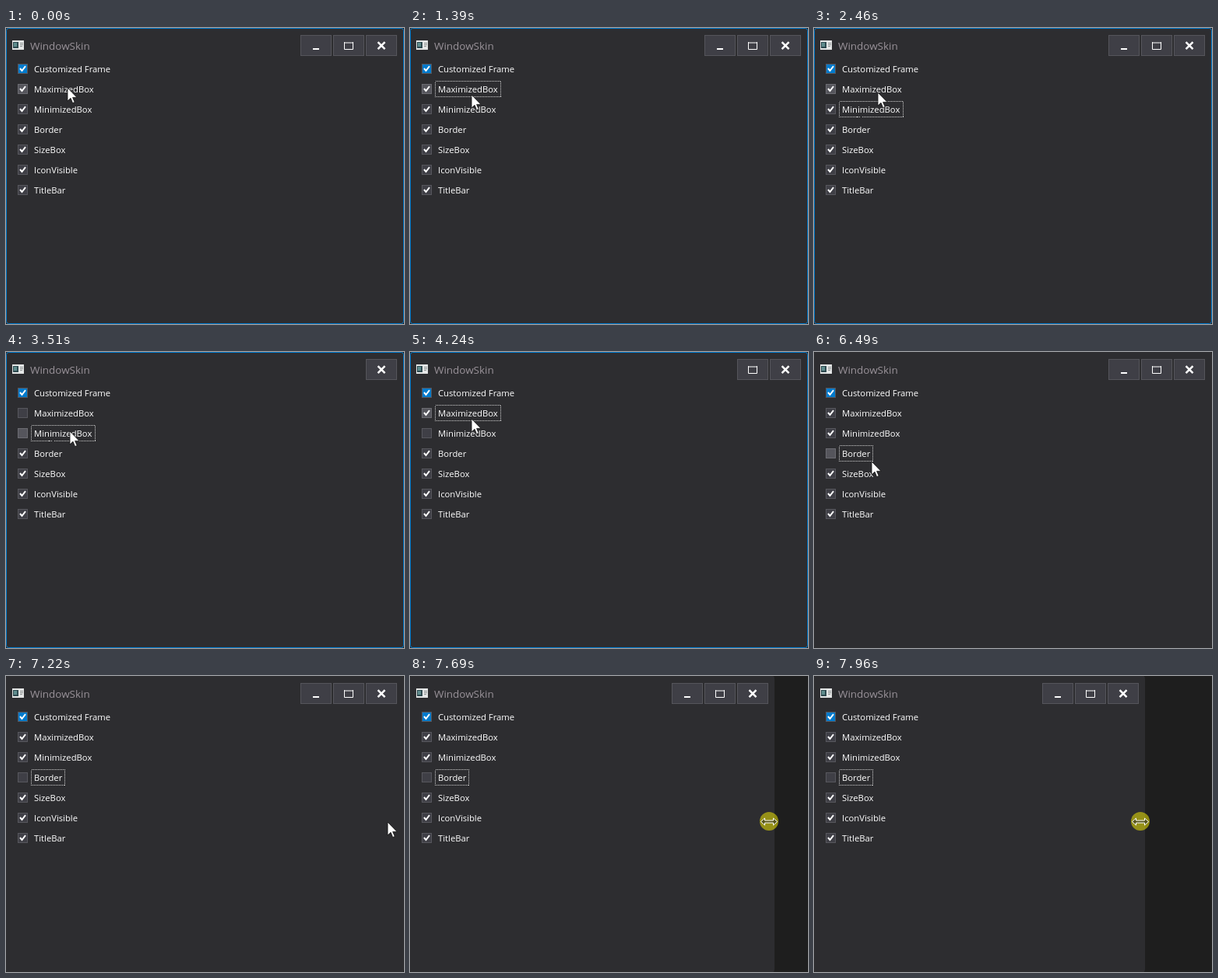
Recreate the animation shown at these times as an HTML page. Size 511 by 381 pixels, loop 8000 ms.

```html
<!DOCTYPE html>
<html lang="en">
<head>
<meta charset="utf-8">
<title>WindowSkin</title>
<style>
  html, body { margin: 0; width: 100%; height: 100%; overflow: hidden; background: #1e1e1e; }
  svg { display: block; width: 511px; height: 381px; }
  text { font-family: "Open Sans", "Noto Sans", sans-serif; }
  .label { font-size: 11.25px; fill: #fff; }
  .title { font-size: 13.45px; fill: #999299; }
  .px { shape-rendering: crispEdges; }
  .btn { fill: #3f3f46; stroke: #55555b; }
</style>
</head>
<body>
<svg id="stage" viewBox="0 0 511 381">
  <rect width="511" height="381" fill="#1e1e1e"/>
  <rect id="win" x="-0.5" y="-0.5" height="382" rx="4" fill="#2d2d30"/>
  <rect id="border" x="0.5" y="0.5" width="510" height="380" rx="3" fill="none" stroke="#007acc"/>
  <g class="px">
    <rect x="8" y="16" width="15" height="12" fill="#e4e6e6"/>
    <rect x="9" y="18" width="7" height="8" fill="#2f4a50"/>
    <rect x="10" y="19" width="4" height="5" fill="#5f8d8e"/>
    <path d="M18 19.5h4M18 21.5h4M18 23.5h3" stroke="#8d9292"/>
  </g>
  <text class="title" x="31" y="28">WindowSkin</text>
  <g id="buttons"></g>
  <g id="rows"></g>
  <rect id="focus" class="px" x="32.5" height="20" fill="none" stroke="#d0d0d0" stroke-dasharray="1 1"/>
  <circle id="halo" r="12" fill="#fff500" fill-opacity=".5"/>
  <path id="arrow" d="M0 0V17L4 13.3L6.6 19.6L9.2 18.5L6.6 12.4H12Z" fill="#fff" stroke="#111" stroke-width=".8"/>
  <path id="sizer" d="M-10.5 0L-5.5 -4.5V-1.5H5.5V-4.5L10.5 0L5.5 4.5V1.5H-5.5V4.5Z" fill="#57551a" stroke="#fff"/>
</svg>
<script>
const LOOP = 8000, TICK = 66.5;
const $ = id => document.getElementById(id);

function add(parent, tag, attrs, text) {
  const el = document.createElementNS("http://www.w3.org/2000/svg", tag);
  set(el, attrs);
  if (text) el.textContent = text;
  parent.appendChild(el);
  return el;
}
function set(el, attrs) {
  for (const k in attrs) el.setAttribute(k, attrs[k]);
}
function show(el, on) { el.style.display = on ? "" : "none"; }
function move(el, x, y) { el.setAttribute("transform", `translate(${x} ${y})`); }

// name, right end of its label
const items = [
  ["Customized Frame", 134], ["MaximizedBox", 113], ["MinimizedBox", 111],
  ["Border", 72], ["SizeBox", 76], ["IconVisible", 93], ["TitleBar", 76]
];
const [MAX, MIN, BORDER] = [1, 2, 3];

const rows = items.map(([name], i) => {
  const g = add($("rows"), "g", { transform: `translate(0 ${26 * i})` });
  const box = add(g, "rect", { class: "px", x: 15.5, y: 46.5, width: 12, height: 12 });
  const tick = add(g, "path", {
    d: "M18 52L20.5 55L25 49.2", fill: "none", stroke: "#fff", "stroke-width": 2
  });
  add(g, "text", { class: "label", x: 36, y: 57 }, name);
  return { box, tick };
});

function makeButton(glyph) {
  const g = add($("buttons"), "g", {});
  add(g, "rect", { class: "btn px", x: .5, y: 9.5, width: 39, height: 26 });
  add(g, "path", Object.assign({ fill: "none", stroke: "#fff" }, glyph));
  return g;
}
const minBtn = makeButton({ d: "M16 27H24", "stroke-width": 2 });
const maxBtn = makeButton({ d: "M14.5 18V27.5H25.5V18M14 19H26" });
const closeBtn = makeButton({ d: "M15.5 18.2L24.5 27.2M24.5 18.2L15.5 27.2", "stroke-width": 2.5 });

// press time, release time, row
const clicks = [
  [400, 530, MAX], [990, 1130, MAX], [1660, 1790, MIN], [2190, 2330, MIN],
  [2790, 2920, MAX], [3310, 3450, MIN], [3910, 4040, MAX], [4570, 4700, MIN],
  [5760, 5890, BORDER]
];
const DRAG = 7490, AT_EDGE = 7280;

// time, x, y of the pointer
const path = [
  [0, 79, 77], [1265, 79, 77], [1460, 79, 103], [2330, 79, 103], [2460, 82, 83],
  [2590, 82, 77], [2990, 82, 77], [3250, 82, 107], [3510, 82, 102], [3580, 82, 102],
  [3840, 81, 77], [4110, 81, 77], [4310, 75, 103], [4700, 74, 103], [4900, 53, 129],
  [4970, 53, 129], [5040, 51, 129], [6430, 51, 129], [6490, 74, 141], [6620, 180, 184],
  [6890, 420, 195], [7280, 504, 187], [7490, 504, 187], [7560, 498, 187],
  [7690, 461, 187], [7830, 434, 187], [7960, 419, 187]
];

// The pointer advances in steps of about one tick.
function pointer(t) {
  let i = path.length - 1;
  while (path[i][0] > t) i--;
  const a = path[i], b = path[i + 1];
  if (!b) return a.slice(1);
  const span = b[0] - a[0], n = Math.max(1, Math.round(span / TICK));
  const f = Math.floor((t - a[0]) / span * n + 1e-6) / n;
  return [1, 2].map(k => Math.round(a[k] + (b[k] - a[k]) * f));
}

function draw(t) {
  const [x, y] = pointer(t);
  const on = items.map(() => true);
  let focus = 0, pressed = 0;
  for (const [down, up, row] of clicks) {
    if (t >= down) focus = row;
    if (t >= up) on[row] = !on[row];
    else if (t >= down) pressed = row;
  }
  const hover = x < 110 ? Math.round((y - 53) / 26) : -1;

  rows.forEach(({ box, tick }, i) => {
    const fill = i === pressed ? "#007acc" : i === hover ? "#55555c" : "#3f3f46";
    set(box, { fill, stroke: i === hover ? "#6c6c72" : "#57575d" });
    show(tick, on[i]);
  });

  const dragging = t >= DRAG;
  const edge = dragging ? Math.min(510, x + (x < 440 ? 6 : 7)) : 510;
  set($("win"), { width: (dragging && edge < 510 ? edge : 511) + .5 });
  show($("border"), on[BORDER]);

  let left = edge - 48;
  move(closeBtn, left, 0);
  for (const [btn, row] of [[maxBtn, MAX], [minBtn, MIN]]) {
    show(btn, on[row]);
    if (on[row]) move(btn, left -= 42, 0);
  }

  show($("focus"), focus);
  if (focus) set($("focus"), { y: 42.5 + 26 * focus, width: items[focus][1] - 29 });

  show($("halo"), pressed || dragging);
  move($("halo"), x, y);
  show($("arrow"), t < AT_EDGE);
  move($("arrow"), x, y);
  show($("sizer"), t >= AT_EDGE);
  move($("sizer"), x, y + .5);
}

const start = performance.now();
function loop() {
  draw((performance.now() - start) % LOOP);
  requestAnimationFrame(loop);
}
loop();
</script>
</body>
</html>
```
